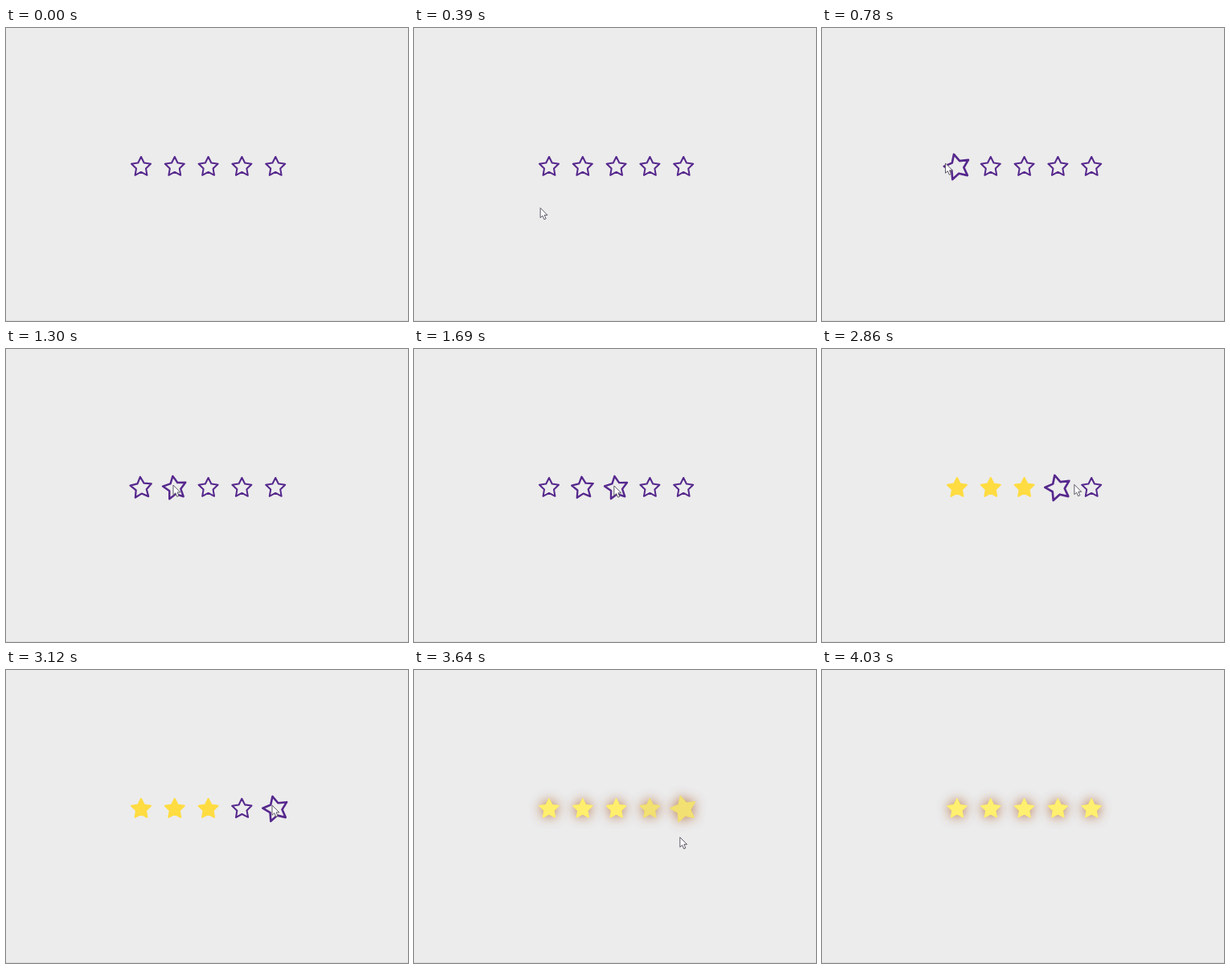
An HTML page with a canvas for the animation above (5330 ms loop, 500 by 364 pixels).

```html
<!DOCTYPE html>
<html lang="en">
<head>
<meta charset="utf-8">
<title>Star rating</title>
<style>
  html, body { margin: 0; width: 100%; height: 100%; overflow: hidden; background: #ececec; }
  canvas { display: block; }
</style>
</head>
<body>
<canvas id="stage" width="500" height="364"></canvas>
<script>
const ctx = document.getElementById('stage').getContext('2d');
const LOOP = 5330, STEP = 130, LAST_CHANGE = 4030, TRANSITION = 300;
const RATE_THREE = 1990, RATE_FIVE = 3390;
const PURPLE = [86, 40, 141], GOLD = [255, 220, 66], LEMON = [255, 240, 112];
const STAR_Y = 172, SPACING = 41.8, REACH_X = SPACING / 2, REACH_Y = 26;

const linear = p => p;
const easeIn = p => p * p;
const easeOut = p => p * (2 - p);
const smooth = p => p * p * (3 - 2 * p);

// The pointer rests between its moves.
const moves = [
  { start: 0, end: 780, from: [168, 390], to: [153.5, 168], ease: easeOut },
  { start: 780, end: 1720, from: [153.5, 168], to: [252, 170], ease: linear },
  { start: 2210, end: 3040, from: [252, 170], to: [331, 168], ease: linear },
  { start: 3380, end: 4030, from: [331, 171], to: [330, 401], ease: easeIn }
];

const starShape = new Path2D('M0-10 3.09-3.74 10-2.73 5 2.14 6.18 9.02 0 5.77-6.18 9.02-5 2.14-10-2.73-3.09-3.74Z');
const arrowShape = new Path2D('M0 0V12.3L2.8 9.7 4.8 14.3 7 13.3 5 8.9H8.8Z');

const lerp = (a, b, p) => a + (b - a) * p;
const mix = (a, b, p) => a.map((v, i) => lerp(v, b[i], p));
const rgb = color => `rgb(${color.map(Math.round)})`;
const portion = (time, start, end) => Math.min(1, Math.max(0, (time - start) / (end - start)));
const progress = (time, start) => smooth(portion(time, start, start + TRANSITION));

function pointerAt(time) {
  const { start, end, from, to, ease } = moves.findLast(move => move.start <= time);
  return mix(from, to, ease(portion(time, start, end)));
}

// A star is hovered from the first to the last moment the pointer is within reach.
function createStar(index) {
  const star = { x: 168 + index * SPACING, enter: Infinity, leave: 0 };
  for (let time = 0; time < LAST_CHANGE; time += 5) {
    const [x, y] = pointerAt(time);
    if (Math.abs(x - star.x) < REACH_X && Math.abs(y - STAR_Y) < REACH_Y) {
      star.enter = Math.min(star.enter, time);
      star.leave = time;
    }
  }
  return star;
}
const stars = Array.from({ length: 5 }, (_, index) => createStar(index));

function drawStar(star, index, time) {
  const hover = progress(time, star.enter) - progress(time, star.leave);
  const three = index < 3 ? progress(time, RATE_THREE) : 0;
  const five = progress(time, RATE_FIVE);
  const scale = 1.2 * (1 + 0.3 * hover);

  ctx.save();
  ctx.translate(star.x, STAR_Y);
  ctx.rotate(-hover * Math.PI / 12);
  ctx.scale(scale, scale);
  ctx.lineWidth = lerp(1.7, 1, five);
  ctx.lineJoin = 'round';
  ctx.strokeStyle = ctx.fillStyle = rgb(mix(mix(PURPLE, GOLD, three), LEMON, five));
  if (five > 0) {
    ctx.shadowColor = `rgba(165, 80, 25, ${0.75 * five})`;
    ctx.shadowBlur = 14;
    ctx.stroke(starShape);
    ctx.fill(starShape);
    ctx.shadowColor = 'transparent';
  }
  ctx.globalAlpha = Math.max(three, five);
  ctx.fill(starShape);
  ctx.globalAlpha = 1;
  ctx.stroke(starShape);
  ctx.restore();
}

function drawPointer([x, y]) {
  ctx.save();
  ctx.translate(x, y);
  ctx.fillStyle = '#fff';
  ctx.strokeStyle = '#5c5866';
  ctx.fill(arrowShape);
  ctx.stroke(arrowShape);
  ctx.restore();
}

function render(now) {
  // The motion advances in held steps and rests at the end.
  const time = Math.min(LAST_CHANGE, Math.floor((now % LOOP) / STEP) * STEP);
  ctx.fillStyle = '#ececec';
  ctx.fillRect(0, 0, 500, 364);
  ctx.fillStyle = '#dedede';
  ctx.fillRect(0, 363, 500, 1);
  stars.forEach((star, index) => drawStar(star, index, time));
  drawPointer(pointerAt(time));
}

const begin = performance.now();
function tick() {
  render(performance.now() - begin);
  requestAnimationFrame(tick);
}
tick();
</script>
</body>
</html>
```
